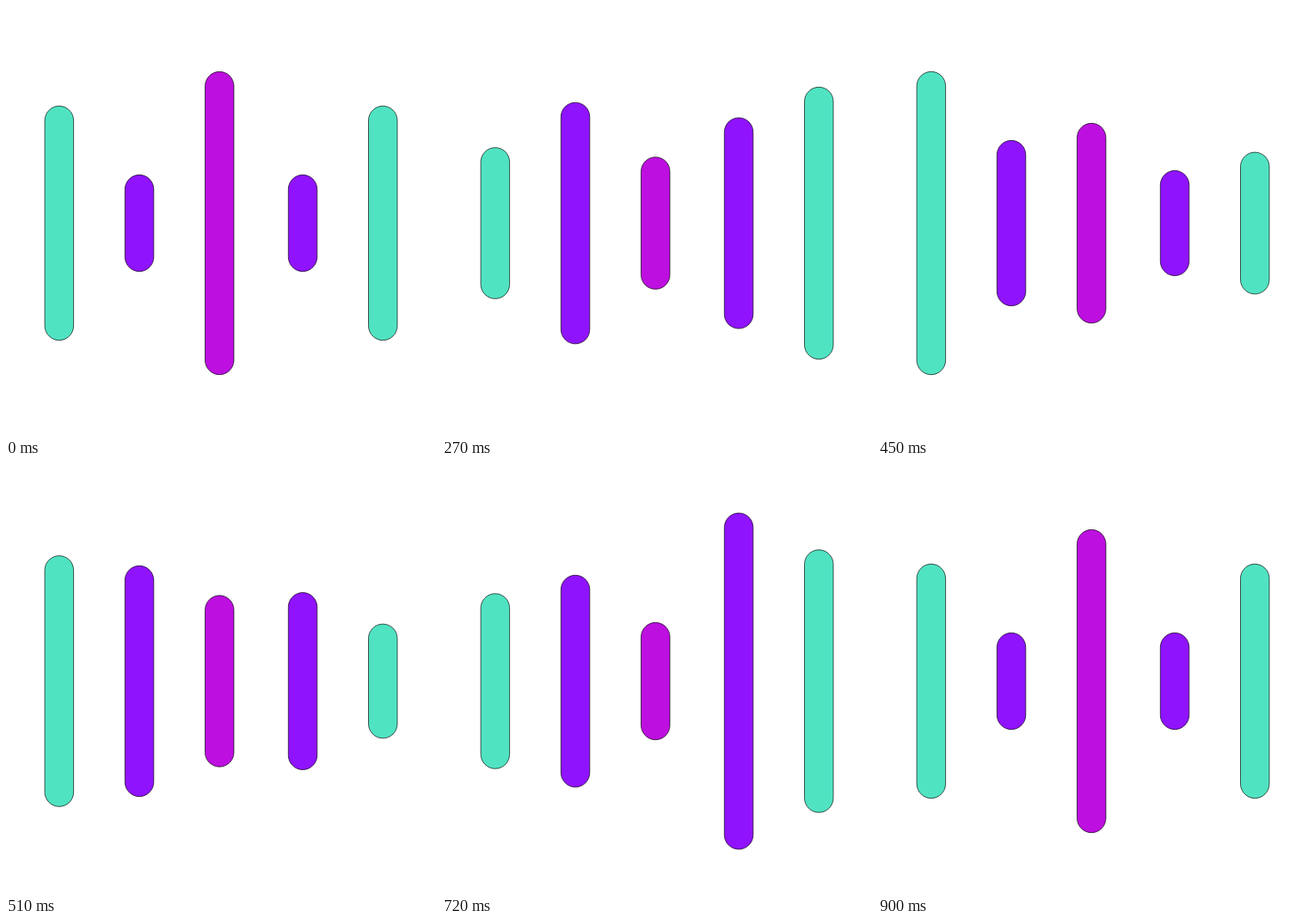
An HTML page with a canvas for the animation above (930 ms loop, 500x500 px).

```html
<!DOCTYPE html>
<html lang="en">
<head>
<meta charset="utf-8">
<title>Equalizer bars</title>
<style>
  html, body { margin: 0; width: 100%; height: 100%; overflow: hidden; background: #fff; }
  canvas { display: block; width: 500px; height: 500px; }
</style>
</head>
<body>
<canvas id="stage" width="500" height="500"></canvas>
<script>
const ctx = document.getElementById('stage').getContext('2d');
const STEP = 30, LAST = 30;
const MIDDLE = 252.5, WIDTH = 33.5, LINE = 0.67, GAP = 93.2;

// Colour and resting top edge, from the centre bar outwards
const rings = [
  { color: '#bd10e0', rest: 76 },
  { color: '#9013fe', rest: 196 },
  { color: '#50e3c2', rest: 116 }
];

// Where each bar turns between two rests: [step, top edge]
const turns = [
  [[5.9, 192.5], [15, 76], [20, 167.5]],
  [[6, 98.5], [15, 156], [19, 80]],
  [[8, 177], [15, 136], [20.5, 196], [22.3, 196]],
  [[7, 116], [14, 196], [22, 36]],
  [[4, 153], [9, 94], [17.5, 186.4], [25.5, 92.8]]
];

const bars = turns.map((points, i) => {
  const { color, rest } = rings[Math.abs(i - 2)];
  const x = 45.1 + GAP * i + (i > 2 ? 3.6 : 0);
  return { x, color, keys: [[0, rest], ...points, [LAST, rest]] };
});

// cubic-bezier(.42, 0, .58, 1), solved by bisection
function easeInOut(p) {
  let lo = 0, hi = 1;
  for (let i = 0; i < 24; i++) {
    const t = (lo + hi) / 2, u = 1 - t;
    const x = 1.26 * t * u * u + 1.74 * t * t * u + t * t * t;
    if (x < p) lo = t; else hi = t;
  }
  return lo * lo * (3 - 2 * lo);
}

function topAt(keys, step) {
  const i = keys.findIndex(([s]) => s >= step) || 1;
  const [s0, v0] = keys[i - 1], [s1, v1] = keys[i];
  return v0 + (v1 - v0) * easeInOut((step - s0) / (s1 - s0));
}

function drawBar({ x, color, keys }, step) {
  const top = topAt(keys, step) + LINE / 2;
  ctx.beginPath();
  ctx.roundRect(x, top, WIDTH, 2 * (MIDDLE - top), WIDTH / 2);
  ctx.fillStyle = color;
  ctx.fill();
  ctx.stroke();
}

function draw(ms) {
  const step = Math.floor(Math.max(0, ms) / STEP) % (LAST + 1);
  ctx.clearRect(0, 0, 500, 500);
  bars.forEach(bar => drawBar(bar, step));
}

ctx.strokeStyle = '#000';
ctx.lineWidth = LINE;
const start = performance.now();
function tick() {
  draw(performance.now() - start);
  requestAnimationFrame(tick);
}
tick();
</script>
</body>
</html>
```
